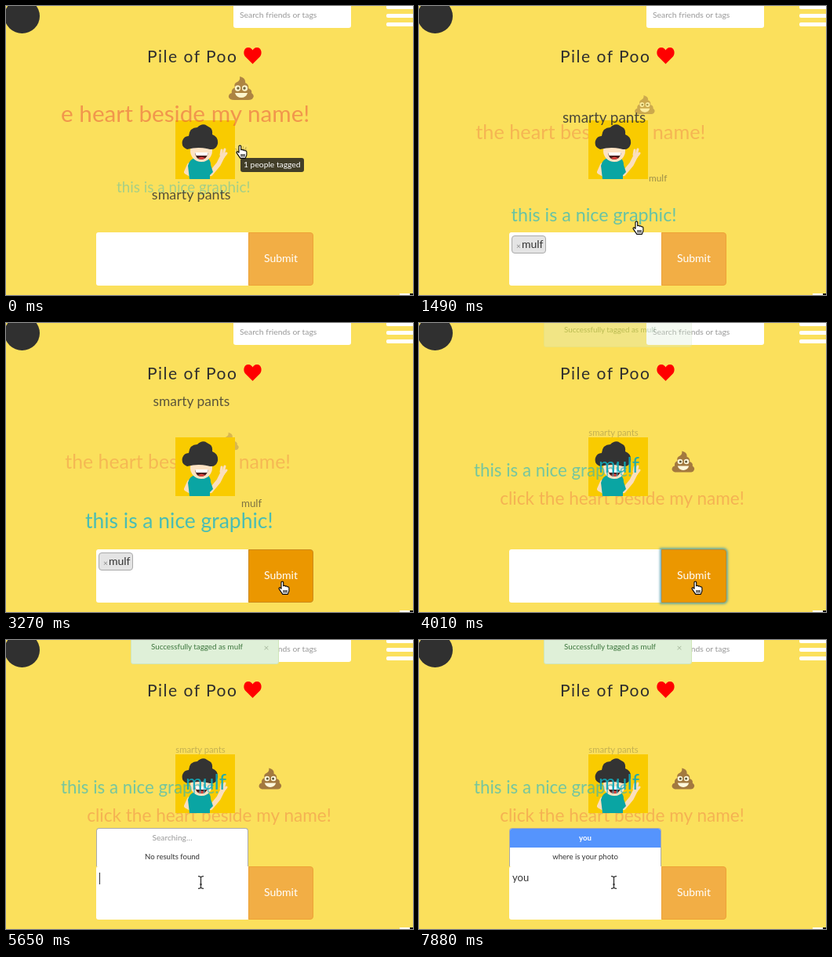
Recreate the animation shown at these times as an HTML page. Size 519x369 px, loop 8 s.

```html
<!DOCTYPE html>
<html lang="en">
<head>
<meta charset="utf-8">
<title>Tag cloud</title>
<style>
html, body { margin: 0; width: 100%; height: 100%; overflow: hidden; background: #fbe05c; }
body { position: relative; font-family: Lato, "Open Sans", sans-serif; color: #333; }
div, svg { position: absolute; box-sizing: border-box; white-space: pre; }
svg { overflow: visible; }
.mid { transform: translate(-50%, -50%); line-height: 1; }
.left { transform: translateY(-50%); line-height: 1; }
#cloud { inset: 0; clip-path: inset(0 0 0 70px); }
.tag { line-height: 1.4; padding: 0 .15em; transform: translate(-50%, -50%); }
.tag.hover { background: rgba(255, 255, 255, .25); }
#avatar { left: 216px; top: 146px; z-index: 2; }
#field { left: 115px; top: 289px; width: 194px; height: 68px; background: #fff; border-radius: 3px 0 0 3px; }
#submit { left: 309px; top: 289px; width: 83px; height: 68px; border: 1px solid #eea236;
  border-radius: 0 4px 4px 0; background: #f2ae45; color: #fff; font-size: 14px; line-height: 63px; text-align: center; }
#submit.over { background: #eb9700; border-color: #cb8a1c; }
#submit.focus { box-shadow: 0 0 3px 2px rgba(60, 150, 175, .75); }
#chip { left: 118px; top: 293px; width: 44px; height: 23px; background: #e4e4e4; border: 1px solid #aaa; border-radius: 4px; }
#tip { height: 18px; padding: 0 4px; background: rgba(42, 40, 34, .88); color: #fff; border-radius: 3px;
  font-size: 10.3px; line-height: 17px; }
#alert { left: 159px; top: -14px; width: 189px; height: 45px; background: #dff0d8; border: 1px solid #d0e6b8;
  border-radius: 3px; color: #3c763d; }
#menu { left: 115px; width: 194px; background: #fff; border: 1px solid #aaa; border-bottom: 0;
  border-radius: 4px 4px 0 0; font-size: 9.6px; text-align: center; overflow: hidden; }
.row { left: 0; width: 100%; height: 24px; line-height: 23px; }
.row.busy { color: #999; font-size: 10.2px; }
.row.pick { background: #5594fd; color: #fff; font-weight: 700; }
#caret { top: 297px; width: 1px; height: 15px; background: #333; }
</style>
</head>
<body>
<div style="left:-2px;top:-9px;width:45px;height:44px;border-radius:50%;background:#303030"></div>
<div style="left:290px;top:-6px;width:150px;height:34px;border-radius:3px;background:#fff"></div>
<div class="left" style="left:298px;top:11px;font-size:10.4px;color:#999">Search friends or tags</div>
<svg width="40" height="28" style="left:485px;top:0" fill="#fff">
  <rect y="-1" width="40" height="5" rx="2"/><rect y="10" width="40" height="5" rx="2"/><rect y="21" width="40" height="5" rx="2"/>
</svg>
<div class="left" style="left:180px;top:63px;font-size:21px;letter-spacing:1.5px;color:#2e2e2e">Pile of Poo</div>
<svg width="23" height="21" viewBox="0 0 23 21" style="left:302.5px;top:52.5px">
  <path fill="#f00" d="M11.5 21 2 11.5C-1 8 0 0 6 0c3 0 4.5 2 5.5 3.5C12.5 2 14 0 17 0c6 0 7 8 4 11.5z"/>
</svg>

<div id="cloud">
  <svg id="avatar" width="76" height="75" viewBox="0 0 76 75">
    <rect width="76" height="75" fill="#f9cb00"/>
    <g fill="none" stroke="#fbdfbd" stroke-linecap="round" stroke-linejoin="round">
      <path stroke-width="6" d="M18 57 14 66 21 70M45 68 55 56 60 46"/>
      <path stroke-width="3" d="M58 44 59 38M61 44 63 37M61 47 65 42"/>
    </g>
    <path fill="#0aa5a3" d="M18 75 16 58Q18 49 26 48H40Q45 50 45 57L48 66 44 70V75Z"/>
    <ellipse cx="33" cy="39" rx="14" ry="14" fill="#fde3c4"/>
    <path fill="#333" d="M15 37Q7 34 9 26 11 20 17 20 18 9 28 9 35 2 42 8 48 10 47 18 55 21 54 30 52 38 44 37 30 33 15 37Z"/>
    <path fill="#4a2020" d="M25 41H42Q40 50 33 50 26 50 25 41Z"/>
    <path fill="#fff" d="M25 41H42L40.500 45H26.500Z"/>
    <path fill="#e0413c" d="M29 48.500Q33 45 38 48.500 33 51 29 48.500Z"/>
  </svg>
</div>

<div id="field"></div>
<div id="submit">Submit</div>
<div id="chip">
  <div class="left" style="left:5px;top:11.5px;font-size:10px;color:#888">×</div>
  <div class="left" style="left:12px;top:9.5px;font-size:14px">mulf</div>
</div>
<div id="typed" class="left" style="left:119px;top:303px;font-size:13px">you</div>
<div id="caret"></div>
<div id="menu"><div class="row"></div><div class="row"></div></div>
<div id="alert">
  <div class="left" style="left:25px;top:22px;font-size:9.8px">Successfully tagged as mulf</div>
  <div class="mid" style="left:172px;top:23px;font-size:12px;color:#a9bba0">×</div>
</div>
<div id="tip"></div>
<svg id="hand" width="15" height="18">
  <path fill="#fff" stroke="#000" stroke-width="1.1" stroke-linejoin="round"
    d="M4 1.8q1.4-1.6 2.7 0v5q1.8-1.2 2.6.4q1.8-.9 2.4.7q2-.5 2.2 1.300v4l-1.600 4.200H5.800L1.200 10.600q-.6-1.900 1.200-1.700L4 10.200zM7 12v3.500M9 12v3.500M11 12v3.500"/>
</svg>
<svg id="beam" width="9" height="17">
  <path fill="none" stroke="#222" stroke-width="1.2" d="M1 .6Q4 .6 4.5 2 5 .6 8 .6M4.5 2V15M1 16.4Q4 16.4 4.5 15 5 16.4 8 16.4M3 11H6"/>
</svg>
<svg width="17" height="3" style="left:502px;top:367px"><rect width="13" height="2" fill="#fff"/><rect x="13" width="4" height="2" fill="#111"/></svg>

<script>
const LOOP = 8000, STEP = 148.5;
const RELOAD = 27, SEARCH = 38, TYPED = 50;
const $ = id => document.getElementById(id);
const show = (el, on) => { el.style.display = on ? "" : "none"; };

const poo = `<svg viewBox="0 0 32 30" style="inset:0;width:100%;height:100%">
<path fill="#8b5d38" d="M14 0Q22 2 21 8 26 10 25 15 30 17 29 21 33 24 31 27 30 30 25 30H7Q1 30 0 26 0 22 4 21 3 16 8 14 6 9 11 7 15 5 14 0Z"/>
<g fill="#fff"><circle cx="11.5" cy="15" r="3.6"/><circle cx="20.5" cy="15" r="3.6"/><path d="M8 21H24Q22 27 16 27 10 27 8 21Z"/></g>
<g fill="#333"><circle cx="12" cy="15" r="1.7"/><circle cx="20" cy="15" r="1.7"/></g></svg>`;

// Each tag rides a ring: dx from the centre, ring radius, start angle in degrees.
// "rest" is its pose after the cloud reloads.
const tags = [
  { text: "click the heart beside my name!", color: "#e9573f", size: 31, dx: -60, radius: 40, angle: 100,
    rest: { x: 259, y: 224, size: 22.6, alpha: .33 } },
  { text: "this is a nice graphic!", color: "#1fb5c9", size: 22, dx: -16, radius: 88, angle: -132,
    rest: { x: 171, y: 188, size: 22.3, alpha: .6 }, hover: n => n >= 5 && n <= 7 },
  { text: "smarty pants", color: "#333", size: 14.4, dx: -3, radius: 86, angle: -38,
    rest: { x: 248, y: 139.5, size: 11.3, alpha: .27 } },
  { text: "mulf", color: "#333", size: 13, dx: 71, radius: 54, angle: -168,
    rest: { x: 255, y: 181, size: 26.4, alpha: .92, color: "#12a9b8" }, hover: n => n <= 1 },
  { html: poo, size: 29.5, dx: 55, radius: 68, angle: 70,
    rest: { x: 337, y: 177, size: 29, alpha: .78 } }
];

for (const tag of tags) {
  tag.el = document.createElement("div");
  tag.el.className = "tag";
  tag.el.innerHTML = tag.html || tag.text;
  $("cloud").append(tag.el);
}

// The cloud spins up, then slows to a halt.
const spin = n => 85 * (1 - Math.exp(-((n / 9.8) ** 2)));

function orbit(tag, n) {
  const a = (tag.angle + spin(n)) * Math.PI / 180;
  const z = Math.cos(a), scale = 1 / (1 - z / 4);
  return {
    x: 240 + tag.dx * scale,
    y: 175 - tag.radius * scale * Math.sin(a),
    size: tag.size * scale,
    alpha: .59 + .31 * z
  };
}

function place(el, x, y) {
  el.style.left = x + "px";
  el.style.top = y + "px";
}

function drawTags(n) {
  for (const tag of tags) {
    const pose = n >= RELOAD ? tag.rest : orbit(tag, n), s = tag.el.style;
    place(tag.el, pose.x, pose.y);
    if (tag.html) {
      s.width = pose.size + "px";
      s.height = pose.size * .94 + "px";
    } else s.fontSize = pose.size + "px";
    s.color = pose.color || tag.color;
    s.opacity = pose.alpha;
    s.zIndex = pose.alpha > .5 ? 3 : 1;
    tag.el.classList.toggle("hover", !!tag.hover && tag.hover(n));
  }
}

const stops = [[0, 300, 186], [6, 260, 252], [14, 298, 313], [16, 354, 338], [33, 354, 338], [34, 328, 333], [36, 248, 309]];

function pointerAt(n) {
  const i = stops.findIndex(p => p[0] > n);
  if (i < 0) return stops[stops.length - 1].slice(1);
  const [n0, x0, y0] = stops[i - 1], [n1, x1, y1] = stops[i];
  const u = (n - n0) / (n1 - n0), e = u * u * (3 - 2 * u);
  return [x0 + (x1 - x0) * e, y0 + (y1 - y0) * e];
}

function drawPointer(n) {
  const [x, y] = pointerAt(n);
  const low = y > 289, onButton = low && x > 309, onField = low && !onButton;
  show($("hand"), !onField);
  show($("beam"), onField);
  place($("hand"), x - 7, y - 9);
  place($("beam"), x - 4.5, y - 8.5);
  $("submit").classList.toggle("over", onButton);
  $("submit").classList.toggle("focus", n >= 25 && n < SEARCH);
}

function drawTip(n) {
  const first = n <= 1;
  show($("tip"), first || n >= 5 && n <= 7);
  $("tip").textContent = (first ? 1 : 2) + " people tagged";
  place($("tip"), first ? 299 : 258, first ? 194 : 279);
}

const busy = ["Searching…", "busy"], none = ["No results found", ""];
const menus = [
  [SEARCH, 240, busy, none],
  [40, 264, none],
  [46, 264, busy, none],
  [TYPED, 240, ["you", "pick"], ["where is your photo", ""]]
];

function drawMenu(n) {
  const state = menus.filter(m => n >= m[0]).pop();
  show($("menu"), state);
  if (!state) return;
  const [, top, ...rows] = state;
  $("menu").style.top = top + "px";
  $("menu").style.height = rows.length * 24 + 1 + "px";
  [...$("menu").children].forEach((el, i) => {
    const [text, cls] = rows[i] || ["", ""];
    el.textContent = text;
    el.className = "row " + cls;
    el.style.top = i * 24 + "px";
  });
}

function draw(t) {
  const n = Math.floor((t + 6) / STEP);
  drawTags(n);
  drawPointer(n);
  drawTip(n);
  drawMenu(n);
  show($("chip"), n >= 3 && n < RELOAD);
  show($("alert"), n >= RELOAD);
  $("alert").style.opacity = Math.min(1, (n - RELOAD + 1) / 3);
  show($("typed"), n >= TYPED);
  show($("caret"), n >= SEARCH && n < 43 || n >= TYPED && n < 53);
  $("caret").style.left = (n < TYPED ? 119 : 140) + "px";
}

function tick() {
  draw(performance.now() % LOOP);
  requestAnimationFrame(tick);
}
tick();
</script>
</body>
</html>
```
